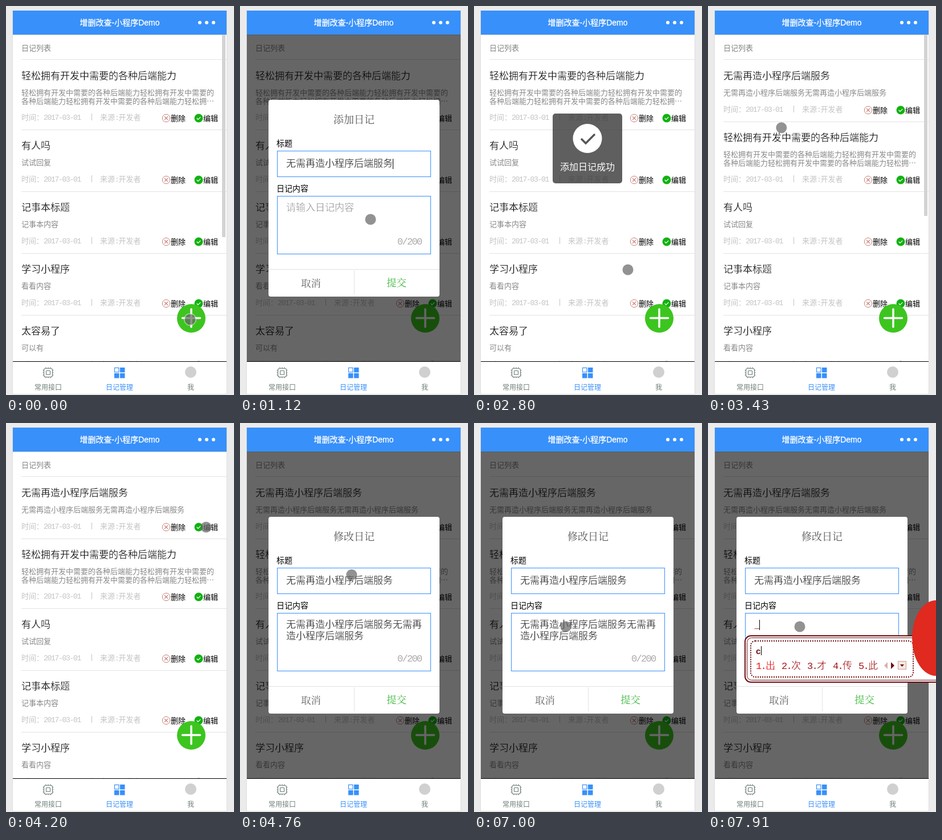
Animation, 400 px wide and 680 px high, one loop 8 s. Source, as an HTML page:

```html
<!DOCTYPE html>
<html lang="zh-CN">
<head>
<meta charset="utf-8">
<style>
  html, body { margin: 0; width: 100%; height: 100%; overflow: hidden; background: #ebebeb; }
  svg { display: block; width: 400px; height: 680px; }
  text { font-family: "Noto Sans CJK SC", "Noto Sans CJK", sans-serif; font-weight: 300; white-space: pre; }
  .num { font-family: "Liberation Mono", monospace; letter-spacing: -.1em; }
  .song { font-family: "Noto Serif CJK SC", "Noto Sans CJK SC", serif; font-weight: 400; }
  .thin { stroke: #fff; stroke-width: .3px; }
  .bar { font-family: "Liberation Sans", "Noto Sans CJK SC", sans-serif; font-weight: 500; stroke: #fff; stroke-width: .3px; }
  .mid { text-anchor: middle; }
</style>
</head>
<body>
<svg id="stage" viewBox="0 0 400 680"></svg>
<script>
const LOOP = 8000;
const BLUE = '#3890fa', GREEN = '#3cc51f', MAROON = '#6d0d10', GREY = '#71807a';
const NOTE = '无需再造小程序后端服务';
const LONG = '轻松拥有开发中需要的各种后端能力';

// Markup helpers; text is placed by the centre of its glyphs.
const text = (x, y, size, fill, str, cls = '', id = '') =>
  `<text x="${x}" y="${y + size * .38}" font-size="${size}" fill="${fill}" class="${cls}" id="${id}">${str}</text>`;
const rect = (x, y, w, h, fill, more = '') =>
  `<rect x="${x}" y="${y}" width="${w}" height="${h}" fill="${fill}" ${more}/>`;
const circle = (x, y, r, fill, more = '') =>
  `<circle cx="${x}" cy="${y}" r="${r}" fill="${fill}" ${more}/>`;
const line = (d, stroke, width, more = '') =>
  `<path d="${d}" fill="none" stroke="${stroke}" stroke-width="${width}" ${more}/>`;
const group = (id, body) => `<g id="${id}">${body}</g>`;

const items = [
  [LONG, LONG + LONG.slice(0, 10), LONG.slice(10) + LONG.slice(0, 16) + '轻松拥…'],
  ['有人吗', '试试回复'],
  ['记事本标题', '记事本内容'],
  ['学习小程序', '看看内容'],
  ['太容易了', '可以有']
];

function item([title, first, second], top) {
  const h = second ? 122 : 108, end = top + h, meta = end - 22, act = end - 20;
  return text(27, top + 28, 17, '#000', title, 'thin')
    + text(27, top + 57.5, 13, '#888', first)
    + (second ? text(27, top + 72.5, 13, '#888', second) : '')
    + text(27, meta, 13, '#c4c4c4', '时间：')
    + text(66, meta, 13, '#c4c4c4', '2017-03-01', 'num')
    + rect(150, meta - 6, 1, 12, '#c4c4c4')
    + text(165, meta, 13, '#c4c4c4', '来源')
    + text(191, meta, 13, '#c4c4c4', ':', 'num')
    + text(197.5, meta, 13, '#c4c4c4', '开发者')
    + circle(281, act, 6.7, 'none', 'stroke="#c58077" stroke-width="1"')
    + line(`M278 ${act - 3}l6 6m0-6l-6 6`, '#c58077', 1.1)
    + text(289, act + .5, 13, '#000', '删除')
    + circle(338, act, 7.5, '#12b212')
    + line(`M334.7 ${act}l2.3 2.5l4.3-4.4`, '#fff', 1.2)
    + text(346, act + .5, 13, '#000', '编辑')
    + rect(27, end, 360, 1, '#e3e3e3');
}

function list(rows) {
  let top = 94;
  return rows.map(row => {
    const out = item(row, top);
    top += row[2] ? 122 : 108;
    return out;
  }).join('');
}

const header = rect(12, 8, 375, 42, BLUE)
  + text(199.5, 29, 14, '#fff', '增删改查-小程序Demo', 'mid bar')
  + [340, 352, 364].map(x => circle(x, 29, 3, '#fff')).join('');

const pins = [70, 74, 78].map(x => `M${x} 631.5v2M${x} 648.5v2`).join('')
  + [637, 641, 645].map(y => `M64.5 ${y}h2M81.5 ${y}h2`).join('');
const tabs = rect(12, 621, 375, 1, '#000') + rect(12, 622, 375, 56, '#fff')
  + line(pins, GREY, 1.2)
  + rect(66.5, 633.5, 15, 15, 'none', `rx="3" stroke="${GREY}" stroke-width="1.2"`)
  + rect(70.5, 637.5, 7, 7, 'none', `rx="1" stroke="${GREY}" stroke-width="1.2"`)
  + rect(190.5, 632.5, 7.5, 7.5, 'none', `stroke="${BLUE}" stroke-width="1.2"`)
  + rect(200, 632, 8.5, 8.5, BLUE) + rect(190, 642, 8.5, 8.5, BLUE) + rect(200, 642, 8.5, 8.5, BLUE)
  + circle(324, 640, 10, '#d0d0d0')
  + text(74, 666, 12, GREY, '常用接口', 'mid')
  + text(199, 666, 12, BLUE, '日记管理', 'mid')
  + text(324, 666, 12, GREY, '我', 'mid');

const fab = circle(325, 546, 25, GREEN)
  + line('M309.5 545.5h31M325 530v31', '#fff', 3.5, 'stroke-linecap="round"');

const modal = rect(12, 50, 375, 571, '#000', 'opacity=".6"')
  + rect(50, 164, 300, 344, '#fff', 'rx="4"')
  + text(200, 198, 18, '#555', '', 'mid song', 'heading')
  + text(64, 240, 14, '#000', '标题')
  + rect(65.5, 253.5, 269, 45, '#fff', `stroke="${BLUE}"`)
  + text(81, 275, 17, '#222', '', 'thin', 'name')
  + text(64, 319, 14, '#000', '日记内容')
  + rect(65.5, 332.5, 269, 101, '#fff', `stroke="${BLUE}"`)
  + text(81, 352, 17, '#222', '', 'thin', 'body1')
  + text(81, 372, 17, '#222', '', 'thin', 'body2')
  + text(276, 411, 17, '#aaa', '0/200', 'num')
  + rect(50, 460, 300, 1, '#e2e2e2') + rect(200, 462, 1, 42, '#e2e2e2')
  + text(124.5, 484, 17.5, '#666', '取消', 'mid song')
  + text(274.5, 483, 17.5, '#3db83d', '提交', 'mid song')
  + rect(0, 0, 1, 18, '#000', 'id="caret"');

const toast = rect(138, 188, 122, 122, '#333', 'rx="5" opacity=".78"')
  + circle(199, 231.5, 25.5, '#fff')
  + line('M188 232l8 8l16-16', '#555', 3.4)
  + text(199, 281, 16, '#fff', '添加日记成功', 'mid');

const words = [...'出次才传此'].map((word, i) => {
  const x = 84 + 45 * i, fill = i ? '#a3161a' : '#e8161a';
  return text(x, 424, 17, fill, `${i + 1}.`, 'num') + text(x + 17, 424, 17, fill, word, 'thin');
}).join('');
const ime = rect(65, 372, 360, 81, '#fff', `rx="10" stroke="${MAROON}" stroke-width="2"`)
  + rect(68.5, 375.5, 353, 74, 'none', `rx="8" stroke="${MAROON}" stroke-width="1"`)
  + rect(75, 381, 285, 63, 'none', `rx="8" stroke="${MAROON}" stroke-width="2" stroke-dasharray="2 2"`)
  + `<text x="84" y="404" font-size="15" fill="${MAROON}" style="font-family:'Liberation Sans',sans-serif;font-weight:700">c</text>`
  + rect(93, 390, 1, 16, '#000')
  + words
  + '<path d="M315 418v12l-6-6z" fill="#d8b0a8"/>'
  + `<path d="M321 418v12l6-6z" fill="${MAROON}"/>`
  + rect(333.5, 416.5, 14, 14, '#f7e6e0', 'stroke="#c9a096"')
  + `<path d="M337 422h7l-3.5 4z" fill="${MAROON}"/>`
  + '<ellipse cx="400" cy="376" rx="42" ry="66" fill="#e0291f"/>';

document.getElementById('stage').innerHTML =
  '<defs><clipPath id="view"><rect x="12" y="50" width="375" height="571"/></clipPath></defs>'
  + rect(11, 8, 377, 671, '#dedede') + rect(12, 8, 375, 670, '#fff')
  + '<g clip-path="url(#view)">'
  + rect(12, 50, 375, 1, '#dcdcdc')
  + text(27, 73, 13, '#808080', '日记列表') + rect(27, 93, 360, 1, '#e3e3e3')
  + group('before', list(items))
  + group('after', list([[NOTE, NOTE + NOTE], ...items.slice(0, 4)]))
  + rect(379, 50, 6, 354, '#d3d3d3', 'id="bar"')
  + fab + '</g>' + header + tabs
  + group('modal', modal) + group('toast', toast) + group('ime', ime)
  + group('pointer', circle(0, 0, 9.5, '#646464', 'opacity=".7"')
    + circle(0, 0, 10.2, 'none', 'id="ring" stroke="#ddd" stroke-opacity=".6" stroke-width="1.6"'));

const el = {};
document.querySelectorAll('#stage [id]').forEach(node => { if (node.id) el[node.id] = node; });

// Pointer path: time, x, y
const path = [
  [0, 323, 548], [280, 323, 548], [560, 150, 267], [840, 150, 267], [1120, 229, 373],
  [1540, 229, 373], [2170, 283, 503], [2450, 283, 503], [2800, 270, 461], [3220, 200, 340],
  [3500, 116, 190], [3920, 351, 182], [4340, 351, 182], [4830, 187, 270], [5180, 182, 272],
  [5670, 188, 357], [5880, 190, 350], [6020, 192, 340], [6300, 194, 357], [6440, 199, 360],
  [6650, 199, 360], [6790, 192, 357], [6860, 192, 357], [7000, 161, 356], [LOOP, 161, 356]
];
// Text caret: from, to, x, y
const carets = [
  [490, 700, 81, 267], [840, 1190, 268, 267], [1260, 1400, 81, 344], [1540, 1820, 217, 364],
  [4900, 5180, 183, 267], [5460, 5740, 183, 267], [5880, 6300, 183, 267],
  [6720, 7000, 200, 344], [7280, 7490, 200, 344], [7490, 7910, 81, 344], [7910, LOOP, 90, 344]
];
const presses = [[0, 210], [2170, 2450], [4270, 4410], [4830, 4970], [6720, 6860]];

const within = (t, [a, b]) => t >= a && t < b;
const show = (node, on) => { node.style.display = on ? '' : 'none'; };
const fade = (t, from, span) => Math.max(0, Math.min(1, 1 - (t - from) / span));

function write(node, str, fill = '#222') {
  if (node.textContent !== str) node.textContent = str;
  node.setAttribute('fill', fill);
}

function pointerAt(t) {
  const i = path.findIndex((p, n) => n && t <= p[0]);
  const [t0, x0, y0] = path[i - 1], [t1, x1, y1] = path[i];
  const k = (t - t0) / (t1 - t0), e = k * k * (3 - 2 * k);
  return [x0 + (x1 - x0) * e, y0 + (y1 - y0) * e];
}

function fields(t) {
  const editing = t > 4000;
  write(el.heading, editing ? '修改日记' : '添加日记', '#555');
  if (t < 840) write(el.name, '请输入日记标题', '#999');
  else write(el.name, NOTE);
  const full = t >= 1540 && t < 7490;
  if (t >= 7910) write(el.body1, '_', '#8a1515');
  else if (t < 1400 || t >= 7490) write(el.body1, '请输入日记内容', '#999');
  else write(el.body1, full ? NOTE + NOTE.slice(0, 3) : NOTE);
  write(el.body2, full ? NOTE.slice(3) : '');

  const caret = carets.find(c => within(t, c));
  show(el.caret, caret);
  if (caret) {
    el.caret.setAttribute('x', caret[2]);
    el.caret.setAttribute('y', caret[3]);
  }
}

function draw(t) {
  const fresh = t >= 3150;
  show(el.before, !fresh);
  show(el.after, fresh);
  el.bar.setAttribute('height', fresh ? 317 : 354);
  el.bar.setAttribute('opacity', fresh ? fade(t, 3640, 280) : fade(t, 70, 210));
  show(el.modal, within(t, [280, 2520]) || t >= 4410);
  show(el.toast, within(t, [2590, 3290]));
  show(el.ime, t >= 7910);
  fields(t);
  el.pointer.setAttribute('transform', `translate(${pointerAt(t)})`);
  show(el.ring, presses.some(p => within(t, p)));
}

const start = performance.now();
function tick() {
  draw((performance.now() - start) % LOOP);
  requestAnimationFrame(tick);
}
tick();
</script>
</body>
</html>
```
